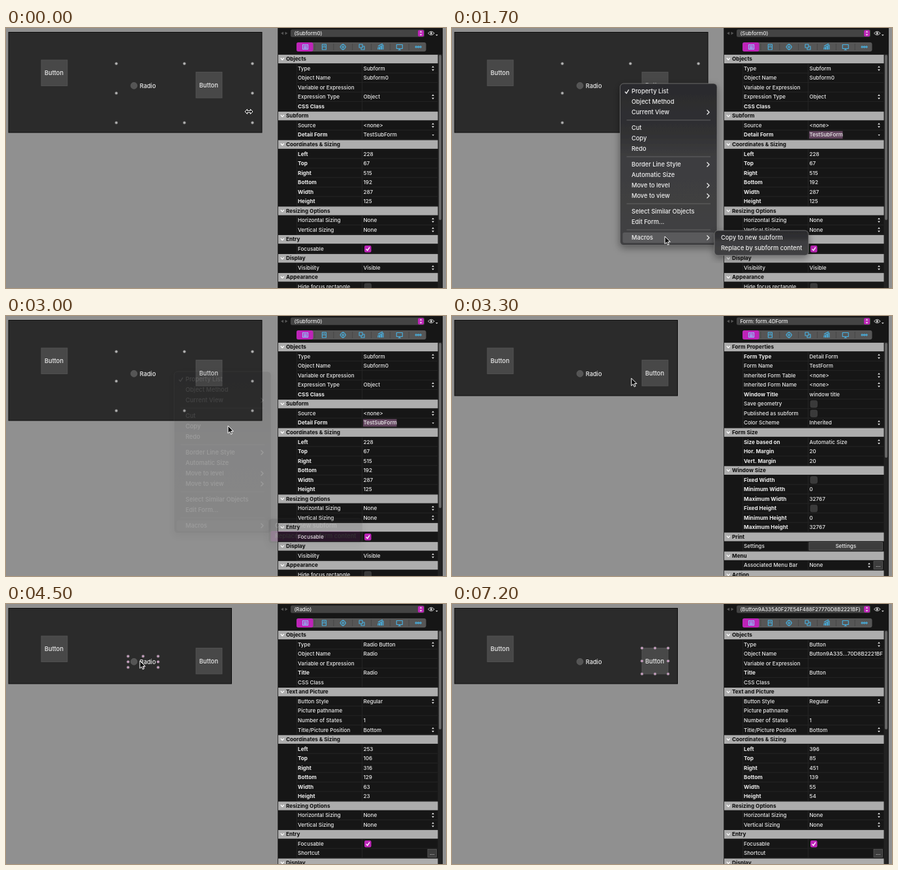
An HTML page for the animation above (7.3 s loop, 674x398 px).

```html
<!DOCTYPE html>
<html lang="en">
<head>
<meta charset="utf-8">
<title>Replace by subform content</title>
<style>
html, body { margin: 0; width: 100%; height: 100%; overflow: hidden; background: #909090; }
svg { display: block; }
text { font-family: Inter, "Open Sans", sans-serif; white-space: pre; }
</style>
</head>
<body>
<svg id="stage" width="674" height="398" viewBox="0 0 674 398"></svg>
<script>
const LOOP = 7300, STEP = 100;
const PINK = '#bd24b8', GREY = '#909090', ROW = 14.53, TOP = 47.3;

const esc = s => s.replace(/&/g, '&amp;').replace(/</g, '&lt;');
const rect = (x, y, w, h, fill, more = '') =>
  `<rect x="${x}" y="${y}" width="${w}" height="${h}" fill="${fill}" ${more}/>`;
const path = (d, stroke, width = 1, fill = 'none') =>
  `<path d="${d}" stroke="${stroke}" stroke-width="${width}" fill="${fill}" stroke-linejoin="round"/>`;
const text = (x, y, s, { size = 8.1, bold = false, fill = '#ececec', anchor = 'start' } = {}) =>
  `<text x="${x}" y="${y + size * .36}" font-size="${size}" font-weight="${bold ? 700 : 500}" fill="${fill}" text-anchor="${anchor}">${esc(s)}</text>`;
const group = (id, body) => `<g id="${id}">${body}</g>`;

// ---- form editor ----
const formButton = (x, y) =>
  rect(x, y, 40, 39.5, '#484848', 'stroke="#565656" stroke-width=".8"') +
  text(x + 19.5, y + 20, 'Button', { size: 9.25, anchor: 'middle' });

function handles(x1, y1, x2, y2, fill) {
  let out = '';
  for (const i of [0, 1, 2]) for (const j of [0, 1, 2]) {
    if (i === 1 && j === 1) continue;
    out += `<circle cx="${x1 + (x2 - x1) * i / 2}" cy="${y1 + (y2 - y1) * j / 2}" r="2.1" fill="${fill}" stroke="#666" stroke-width=".7"/>`;
  }
  return out;
}

const editor =
  rect(4, 6.5, 388, 153.5, '#2b2b2b', 'id="canvas" stroke="#0c0c0c"') +
  formButton(54, 49) + formButton(291, 67.5) +
  '<circle cx="196" cy="88.3" r="5" fill="#555" stroke="#636363" stroke-width=".6"/>' +
  text(204.7, 88.5, 'Radio', { size: 9.25 }) +
  group('selSubform', handles(169, 54.5, 377.5, 145, '#b5b5b5')) +
  group('selRadio', handles(187, 80, 233, 97, '#d0a3c8')) +
  group('selButton', handles(291, 67.5, 331, 107, '#d0a3c8'));

// ---- property list: "#" section, "*" bold label, label|value|control ----
const sizing = (...v) => ['#Coordinates & Sizing',
  ...['Left', 'Top', 'Right', 'Bottom', 'Width', 'Height'].map((n, i) => `*${n}|${v[i]}`)];
const resizing = ['#Resizing Options', 'Horizontal Sizing|None|step', 'Vertical Sizing|None|step'];
const control = (type, name, title, style, ...box) => [
  '#Objects', `Type|${type}|step`, `Object Name|${name}`, 'Variable or Expression', `*Title|${title}`, 'CSS Class',
  '#Text and Picture', `Button Style|${style}|step`, 'Picture pathname', 'Number of States|1',
  'Title/Picture Position|Bottom|step', ...sizing(...box), ...resizing,
  '#Entry', 'Focusable||on', 'Shortcut||more', '#Display'];

const lists = {
  subform: { title: '(Subform0)', thumb: 253, rows: [
    '#Objects', 'Type|Subform|step', 'Object Name|Subform0', 'Variable or Expression',
    'Expression Type|Object|step', '*CSS Class', '#Subform', 'Source|<none>|step', '*Detail Form|TestSubForm|drop',
    ...sizing(228, 67, 515, 192, 287, 125), ...resizing,
    '#Entry', 'Focusable||on', '#Display', 'Visibility|Visible|step', '#Appearance', 'Hide focus rectangle||off'] },
  form: { title: 'Form: form.4DForm', thumb: 176, rows: [
    '#Form Properties', '*Form Type|Detail Form|step', 'Form Name|TestForm', 'Inherited Form Table|<none>|step',
    'Inherited Form Name|<none>|step', '*Window Title|window title', 'Save geometry||off',
    'Published as subform||off', 'Color Scheme|Inherited|step',
    '#Form Size', '*Size based on|Automatic Size|step', '*Hor. Margin|20', '*Vert. Margin|20',
    '#Window Size', '*Fixed Width||off', '*Minimum Width|0', '*Maximum Width|32767',
    '*Fixed Height||off', '*Minimum Height|0', '*Maximum Height|32767',
    '#Print', 'Settings|Settings|button', '#Menu', 'Associated Menu Bar|None|both', '#Action'] },
  radio: { title: '(Radio)', thumb: 151, rows:
    control('Radio Button', 'Radio', 'Radio', 'Regular', 253, 106, 316, 129, 63, 23) },
  button: { title: '(Button9A33540F27E54F488F27770D8B2221BF)', thumb: 151, rows:
    control('Button', 'Button9A335...70D8B2221BF', 'Button', 'Regular', 396, 85, 451, 139, 55, 54) }
};

const stepper = (x, y) => path(`M${x - 1.9} ${y - 1.3}l1.9-2.5 1.9 2.5zM${x - 1.9} ${y + 1.3}l1.9 2.5 1.9-2.5z`, 'none', 0, '#e4e4e4');
const smallButton = (x, y, w, s) =>
  rect(x, y - 6, w, 12, '#3d3d3d', 'stroke="#606060" stroke-width=".7"') +
  text(x + w / 2, y, s, { anchor: 'middle' });
const more = y => smallButton(646, y, 13.5, '...');
const controls = {
  step: y => stepper(654, y),
  drop: y => path(`M652.5 ${y - .5}h3.4l-1.7 2.2z`, 'none', 0, '#ccc'),
  on: y => rect(549, y - 5, 10.5, 10.5, PINK, 'rx="2.2"') + path(`M551.6 ${y + .4}l2 2.3 3.4-5`, '#fff', 1.4),
  off: y => rect(549, y - 5, 10.5, 10.5, '#3a3a3a', 'rx="2.2" stroke="#484848" stroke-width=".6"'),
  more,
  both: y => stepper(639, y) + more(y)
};

function propRow(row, i) {
  const y = +(TOP + ROW * i).toFixed(2);
  if (row[0] === '#')
    return rect(417, y - 6.4, 244.5, 13.2, '#adadad') + path(`M420.8 ${y - 1.3}l2.5 2.7 2.5-2.7`, '#fff', 1.3) +
      text(429, y, row.slice(1), { size: 8.2, bold: true, fill: '#0b0b0b' });
  const bold = row[0] === '*';
  const [label, value = '', kind] = row.slice(+bold).split('|');
  const line = path(`M445.5 ${y + 7.2}H661M445.5 ${y - 7}v14M545.5 ${y - 7}v14`, '#2c2c2c', .7);
  const mark = label === 'Detail Form' ? rect(547, y - 5.8, 51.5, 11.6, '#63465f', 'id="mark"') : '';
  const cell = kind === 'button' ? smallButton(547, y, 112.5, value)
    : text(547.5, y, value) + (kind ? controls[kind](y) : '');
  return line + mark + text(447, y, label, { size: bold ? 8.2 : 8.1, bold }) + cell;
}

const list = ([id, p]) => group(`${id}List`,
  text(441.5, 8, p.title, { size: 7.8 }) + p.rows.map(propRow).join('') +
  rect(663, 41, 4, p.thumb, '#666', 'rx="2"'));

// ---- inspector frame with tab icons ----
const icons = [
  'M-4-3.5h8v7h-8zM-2.5-1.5h5M-2.5 .2h5M-2.5 1.9h5',
  'M-3-4h6v8h-6zM-3 0h6M-1.2-2h2.4',
  'M-3.6 0a3.6 3.6 0 1 0 7.2 0a3.6 3.6 0 1 0-7.2 0M-1.2 0a1.2 1.2 0 1 0 2.4 0a1.2 1.2 0 1 0-2.4 0M0-5v1.4M0 5v-1.4M-5 0h1.4M5 0h-1.4',
  'M-4-4h5v5h-5zM-1 1v3h5v-5h-3',
  'M-4 4v-3h2v3M-1 4v-5h2v5M2 4v-7h2v7M-4-1l3-2 4-2',
  'M-4.5-3.5h9v6h-9zM0 2.5v2M-2 4.5h4',
  'M-4.5 0a1.1 1.1 0 1 0 2.2 0a1.1 1.1 0 1 0-2.2 0M-1.1 0a1.1 1.1 0 1 0 2.2 0a1.1 1.1 0 1 0-2.2 0M2.3 0a1.1 1.1 0 1 0 2.2 0a1.1 1.1 0 1 0-2.2 0'
];
const inspector =
  rect(417, 0, 252, 398, '#161616') + rect(416, 0, 1, 398, '#333') +
  rect(661.5, 40, 7, 358, '#222') + rect(669, 0, 5, 398, GREY) +
  path('M425 5.7v4.8l-4-2.4zM427.5 5.7v4.8l4-2.4z', 'none', 0, '#555') +
  rect(436, 2.3, 205, 11.5, '#444', 'rx="2.5"') + rect(631, 3.2, 9, 9.8, PINK, 'rx="2"') + stepper(635.5, 8) +
  path('M646.5 8q4.8-5.5 9.6 0q-4.8 5.5-9.6 0z', '#ccc', 1) + '<circle cx="651.3" cy="8" r="1.7" fill="#ccc"/>' +
  path('M658 10h3.6l-1.8 2.3z', 'none', 0, '#ccc') +
  rect(445, 22, 198.5, 14, '#565656', 'rx="3"') + rect(445, 22, 25.5, 14, PINK, 'rx="3"') +
  icons.map((d, i) => {
    const x = 458.5 + 28.85 * i;
    return (i ? path(`M${x - 14.4} 24v10`, '#444', .8) : '') +
      `<g transform="translate(${x} 29)">${path(d, i ? '#48b4e6' : '#8cc8fa', 1.1)}</g>`;
  }).join('');

// ---- context menu ----
const items = [
  [97, 'Property List'], [113, 'Object Method'], [129, 'Current View', 1],
  [153, 'Cut'], [169, 'Copy'], [185, 'Redo'],
  [209, 'Border Line Style', 1], [225, 'Automatic Size'], [241, 'Move to level', 1], [257, 'Move to view', 1],
  [281, 'Select Similar Objects'], [297, 'Edit Form...'], [321, 'Macros', 1]];
const subItems = [[321, 'Copy to new subform'], [337, 'Replace by subform content']];
const panel = (x, y, w, h) =>
  rect(x, y, w, h, 'url(#glass)', 'rx="5.5" stroke="#777" stroke-width=".8" filter="url(#shade)"');
const menuText = { size: 9.25, fill: '#f0f0f0' };

const menu = panel(257.5, 85, 148.5, 247.5) +
  rect(261.5, 0, 140.5, 16, PINK, 'id="hover" rx="2.5"') +
  [141, 197, 269, 309].map(y => path(`M267.5 ${y}H396`, '#686868', .9)).join('') +
  path('M265 97.5l2.2 2.7 3.6-5.8', '#f0f0f0', 1.3) +
  items.map(([y, s, sub]) => text(275, y, s, menuText) +
    (sub ? path(`M390.5 ${y - 3.5}l3.5 3.5-3.5 3.5`, '#f0f0f0', 1.3) : '')).join('');
const submenu = panel(402, 310, 144, 38) +
  rect(405.5, 0, 137, 16, PINK, 'id="subHover" rx="2.5"') +
  subItems.map(([y, s]) => text(412, y, s, menuText)).join('');

const defs = `<defs>
  <linearGradient id="glass" x1="0" y1="0" x2="0" y2="1"><stop offset="0" stop-color="#2b2b2d"/><stop offset=".3" stop-color="#303032"/><stop offset=".45" stop-color="#3d3d3f"/><stop offset="1" stop-color="#414143"/></linearGradient>
  <filter id="shade" x="-20%" y="-20%" width="140%" height="150%"><feDropShadow dx="0" dy="4" stdDeviation="6" flood-opacity=".4"/></filter>
</defs>`;

const cursors =
  group('arrow', path('M0 0V11.5L2.7 9 4.5 13 6.4 12.2 4.7 8.3H8.3Z', '#fff', 1, '#080808')) +
  group('resize', path('M-6 0l3.6-3.7v2.4h4.8v-2.4L6 0 2.4 3.7V1.3h-4.8v2.4z', '#fff', 1, '#111'));

const $ = id => document.getElementById(id);
$('stage').innerHTML = defs + rect(0, 0, 674, 398, GREY) + editor + inspector +
  Object.entries(lists).map(list).join('') + group('menu', menu) + group('submenu', submenu) + cursors;

// ---- timeline ----
const route = [[0, 372, 128], [100, 372, 128], [300, 572, 161], [400, 572, 161], [600, 257, 86], [700, 257, 86],
  [1000, 358, 283], [1200, 350, 290], [1500, 318, 319], [1800, 330, 319], [2100, 420, 321], [2400, 453, 335],
  [2700, 453, 336], [3000, 340, 168], [3400, 253, 71], [3700, 253, 71], [3900, 205, 87], [4500, 205, 87],
  [4900, 310, 91], [5600, 310, 91], [6000, 540, 362]];
const fade = [[2700, 1], [2800, .6], [2900, .28], [3000, .12], [3100, 0]];

function at(keys, t) {
  const i = keys.findIndex(k => k[0] > t);
  if (i < 0) return keys[keys.length - 1].slice(1);
  if (!i) return keys[0].slice(1);
  const a = keys[i - 1], b = keys[i], u = (t - a[0]) / (b[0] - a[0]);
  return a.slice(1).map((v, k) => v + (b[k + 1] - v) * u);
}
const show = (id, on) => { $(id).style.display = on ? '' : 'none'; };

function hover(id, rows, y, on, fill = PINK) {
  const row = rows.find(r => Math.abs(r[0] - y) <= 8);
  show(id, on && row);
  if (row) $(id).setAttribute('y', row[0] - 8);
  $(id).setAttribute('fill', fill);
}

function draw(t) {
  const [x, y] = at(route, t);
  const [alpha] = at(fade, t);
  const replaced = t >= 3200, subOpen = t >= 1700;

  $('canvas').setAttribute('width', replaced ? 341.5 : 388);
  $('canvas').setAttribute('height', replaced ? 115.5 : 153.5);
  show('selSubform', !replaced);
  show('selRadio', t >= 4000 && t < 4900);
  show('selButton', t >= 4900);

  const current = t < 3300 ? 'subform' : t < 4000 ? 'form' : t < 4900 ? 'radio' : 'button';
  for (const id in lists) show(`${id}List`, id === current);
  show('mark', t >= 400);

  show('menu', t >= 700 && alpha > 0);
  show('submenu', subOpen && alpha > 0);
  $('menu').style.opacity = $('submenu').style.opacity = alpha;
  hover('hover', items, subOpen ? 321 : y, t >= 800, subOpen ? '#5a5a5c' : PINK);
  const chosen = t >= 2700;
  hover('subHover', subItems, chosen ? 337 : y, chosen || x > 402);

  show('resize', t < 100);
  show('arrow', t >= 100 && t < 6100);
  $('resize').setAttribute('transform', `translate(${x} ${y})`);
  $('arrow').setAttribute('transform', `translate(${x} ${y})`);
}

const start = performance.now();
function tick() {
  const t = (performance.now() - start) % LOOP;
  draw(Math.floor(t / STEP) * STEP);
  requestAnimationFrame(tick);
}
tick();
</script>
</body>
</html>
```
